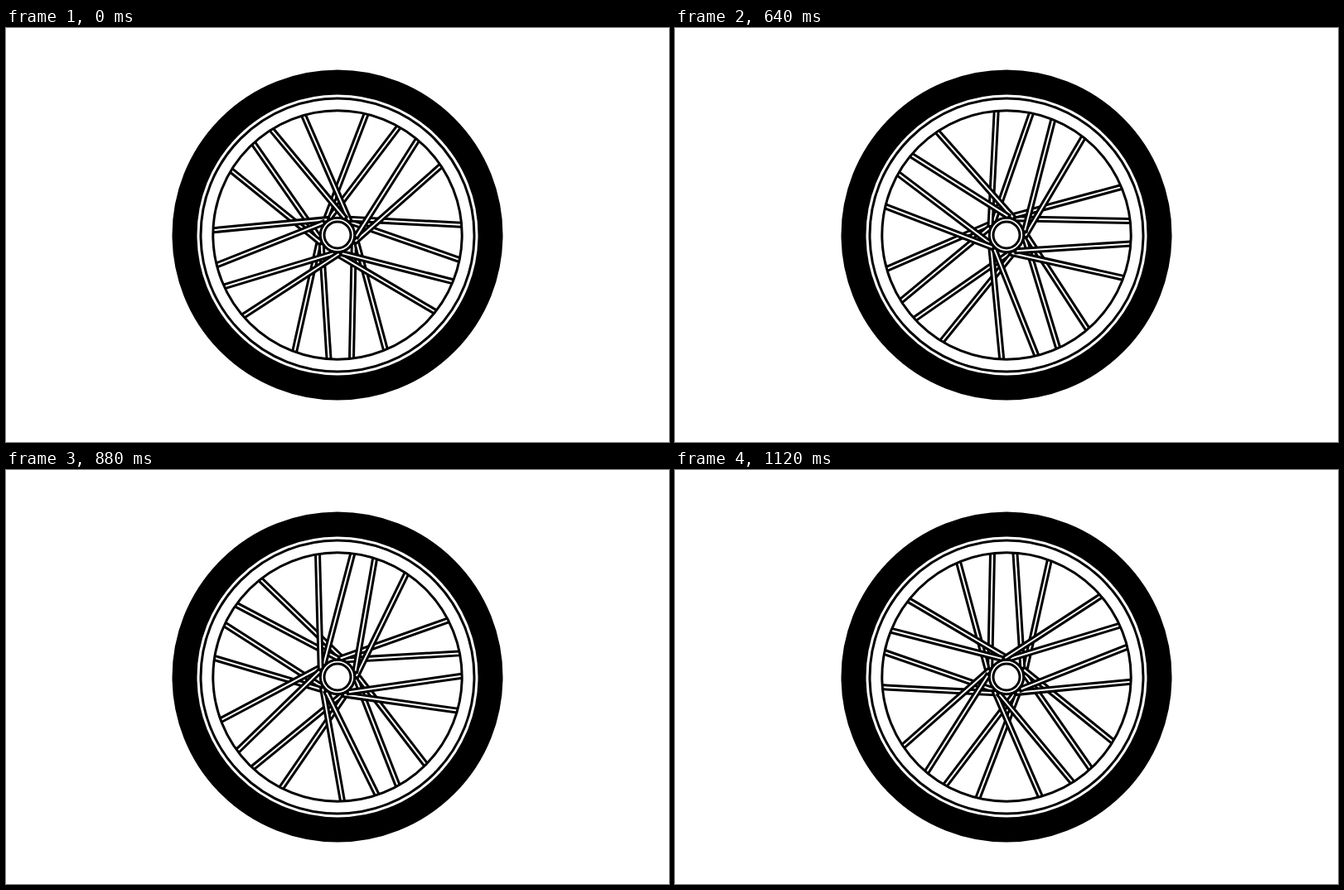
Write an HTML page that moves like this. It is 800 px wide and 500 px high and loops after 1160 ms.

```html
<!DOCTYPE html>
<html lang="en">
<head>
<meta charset="utf-8">
<title>Wheel</title>
<style>
  html, body { margin: 0; width: 100%; height: 100%; overflow: hidden; background: #fff; }
  svg { display: block; width: 100vw; height: 100vh; }
  circle { fill: none; stroke: #000; stroke-width: 3; }
</style>
</head>
<body>
<svg viewBox="-400 -250 800 500">
  <g id="spokes"></g>
  <circle r="184.5" stroke-width="30" style="stroke-width:30"/>
  <circle r="165"/>
  <circle r="150.2"/>
  <circle r="20.7" style="fill:#fff"/>
  <circle r="16"/>
</svg>
<script>
const LOOP = 1160, STEP = 40;
const SPIN_START = 448, SPIN_TIME = 640, SPIN_ANGLE = 180;
const RIM = 150, TANGENT = 20, HUB_GAP = 8;
const spokes = document.getElementById('spokes');

function addLine(x, y1, y2, angle, color, width) {
  const line = document.createElementNS('http://www.w3.org/2000/svg', 'line');
  const attributes = { x1: x, x2: x, y1, y2, stroke: color, 'stroke-width': width, transform: `rotate(${angle})` };
  for (const name in attributes) line.setAttribute(name, attributes[name]);
  spokes.append(line);
}

// A spoke touches the hub circle on the given side and meets the rim at rimAngle.
function addSpoke(rimAngle, side) {
  const lean = Math.asin(TANGENT / RIM) * 180 / Math.PI;
  const angle = rimAngle - side * lean;
  const end = -Math.sqrt(RIM ** 2 - TANGENT ** 2);
  addLine(side * TANGENT, -HUB_GAP, end, angle, '#000', 8);
  addLine(side * TANGENT, -HUB_GAP - 3, end, angle, '#fff', 2);
}

// Each group overlaps the next one clockwise, so groups are stacked backwards.
for (const group of [2, 1, 0, 4, 3]) {
  const axis = 34.75 + group * 72;
  for (const offset of [21.45, 5.25, -5.25, -21.45]) addSpoke(axis + offset, Math.sign(offset));
}

function draw() {
  const time = Math.floor(performance.now() % LOOP / STEP) * STEP;
  const progress = Math.min(1, Math.max(0, (time - SPIN_START) / SPIN_TIME));
  spokes.setAttribute('transform', `rotate(${progress * SPIN_ANGLE})`);
  requestAnimationFrame(draw);
}
draw();
</script>
</body>
</html>
```
